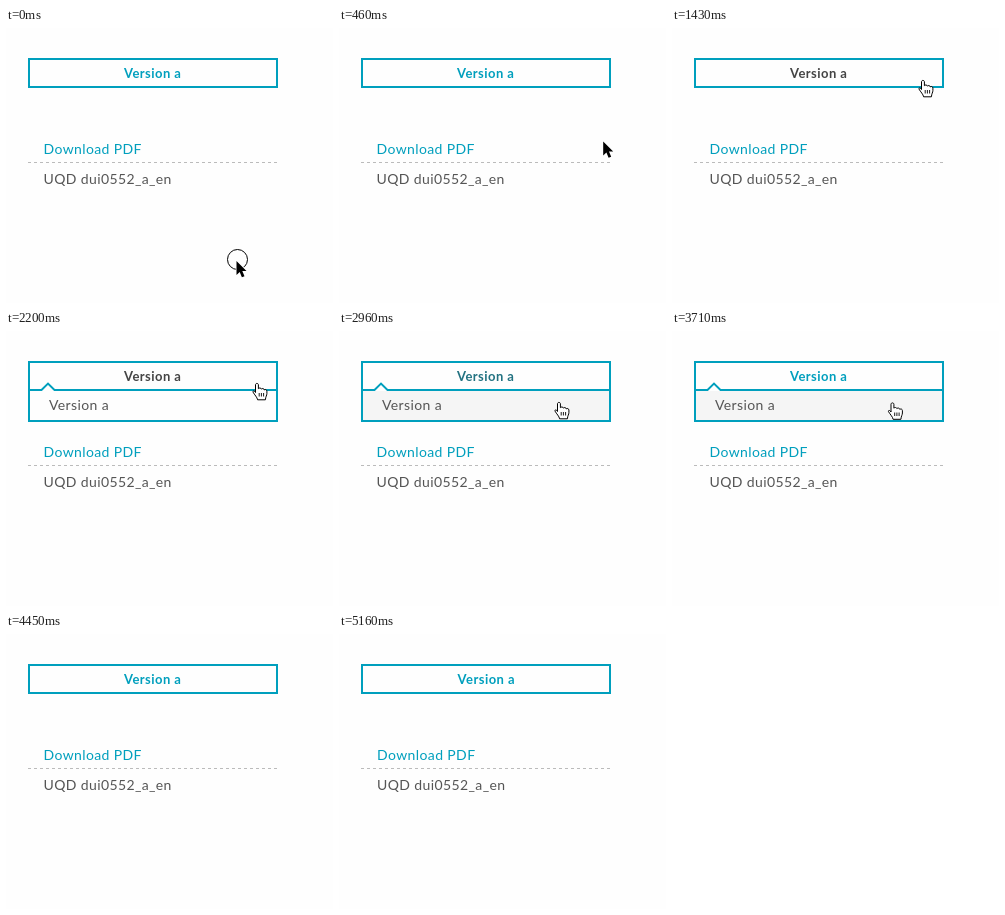
Recreate the animation shown at these times as an HTML page. Size 327 px wide and 275 px high, loop 5260 ms.

```html
<!DOCTYPE html>
<html lang="en">
<head>
<meta charset="utf-8">
<title>Version menu</title>
<style>
html, body { margin: 0; width: 100%; height: 100%; overflow: hidden; background: #fefefe; }
svg { display: block; width: 327px; height: 275px; }
text { font: 14px Lato, "Open Sans", sans-serif; letter-spacing: .38px; fill: #555; }
#title { font-size: 13px; font-weight: 700; letter-spacing: .45px; }
#link { fill: #009fbd; }
.line { fill: none; stroke: #009fbd; stroke-width: 2; }
</style>
</head>
<body>
<svg viewBox="0 0 327 275">
  <g id="page">
    <rect class="line" x="23" y="31" width="248" height="28"/>
    <path d="M22 134.5H272" stroke="#bbb" stroke-dasharray="3 3"/>
    <g id="words">
      <text id="title" x="118" y="50">Version a</text>
      <text id="link" x="37.5" y="126">Download PDF</text>
      <text x="37.5" y="156">UQD dui0552_a_en</text>
    </g>
    <g id="menu">
      <rect id="option" x="23" y="59" width="248" height="31"/>
      <path d="M35.5 60L42 52.5L48.5 60Z" fill="#fefefe"/>
      <path d="M36.5 59H47.5" stroke="#fefefe" stroke-width="2"/>
      <path class="line" d="M23 59H35.5L42 52.6L48.5 59H271V90H23Z"/>
      <text x="43" y="79">Version a</text>
    </g>
  </g>
  <g id="pointer">
    <circle id="ring" r="10" fill="none" stroke="#000"/>
    <path id="arrow" transform="translate(-1 1.5)" fill="#000" stroke="#fff" stroke-width="1.4" paint-order="stroke"
      d="M0 0V14L3.2 11.1L5.4 16.3L8 15.2L5.8 10.1H10Z"/>
    <g id="hand" transform="translate(-6.5 1)" stroke="#000" stroke-linejoin="round">
      <path fill="#fff" d="M3.5 10V2.4C3.5 .4 6.4 .4 6.4 2.4V6.2C7 5.1 9.2 5.3 9.4 6.6C10.2 5.6 12.1 6 12.3 7.4C13.2 6.6 14.9 7 14.9 8.6V11C14.9 13 13.6 14 13.4 17.3H5.6C5.2 14.8 2.6 12.4 1 9.6C.5 8.4 2.2 7.6 3.5 10Z"/>
      <path d="M7.2 10.5V14M9.4 10.5V14M11.6 10.5V14" stroke-width=".9"/>
    </g>
  </g>
</svg>
<script>
const LOOP = 5260;
const $ = id => document.getElementById(id);
const [page, words, title, menu, option, pointer, ring, arrow, hand] =
  ["page", "words", "title", "menu", "option", "pointer", "ring", "arrow", "hand"].map($);

const TEAL = [0, 159, 189], DARK = [68, 68, 68];
const mix = (a, b, p) => a + (b - a) * p;
const smooth = p => p * p * (3 - 2 * p);
const within = (t, a, b) => t >= a && t < b;
const show = (el, on) => el.setAttribute("visibility", on ? "visible" : "hidden");

// Progress from 0 to 1 in n jumps, the first at a and the last at b
function steps(t, a, b, n) {
  if (t < a) return 0;
  return Math.min(n, 1 + Math.floor((t - a) / (b - a) * (n - 1) + 0.15)) / n;
}

const START = [231.5, 231.5], REST = [265.5, 90.5], TITLE = [252.5, 50.5],
      OPTION = [221.5, 69.5], LEAVE = [296.5, 206.5], EXIT = [292, 284];
const between = (a, b, px, py) => [mix(a[0], b[0], px), mix(a[1], b[1], py)];

function position(t) {
  if (t < 1040) {
    const p = steps(t, 60, 580, 10), e = (p + smooth(p)) / 2;
    return between(START, REST, 1 - (1 - e) ** 2.5, e);
  }
  if (t < 2730) {
    const p = steps(t, 1040, 1211, 4);
    return between(REST, TITLE, 1 - (1 - p) ** 2.5, 1 - (1 - p) ** 1.6);
  }
  if (t < 3710) {
    const p = smooth(steps(t, 2730, 2958, 5));
    return between(TITLE, OPTION, p, p);
  }
  if (t < 3830) return [OPTION[0] + 0.5, OPTION[1] + 0.5];
  if (t < 4290) {
    const p = steps(t, 3830, 4230, 8);
    return between(OPTION, LEAVE, 1 - (1 - p) ** 1.5, p ** 1.2);
  }
  const p = steps(t, 4290, 4450, 4);
  return between(LEAVE, EXIT, p, p);
}

function draw(t) {
  const dark = steps(t, 1211, 1430, 4) - steps(t, 2850, 3070, 4);
  title.style.fill = `rgb(${TEAL.map((c, i) => Math.round(mix(c, DARK[i], dark)))})`;

  show(menu, within(t, 2200, 3830));
  option.setAttribute("fill", t >= 2850 ? "#f5f5f5" : "#fefefe");

  // The page reloads after the choice
  page.setAttribute("opacity", within(t, 4810, 5040) ? 0 : within(t, 5040, 5160) ? 0.5 : 1);
  words.setAttribute("transform", `translate(${t >= 5040 ? 0.6 : 0} 0)`);

  const [x, y] = position(t), pointing = within(t, 1150, 3830);
  pointer.setAttribute("transform", `translate(${x} ${y})`);
  show(pointer, t < 4450);
  show(hand, pointing && t < 4450);
  show(arrow, !pointing && t < 4450);
  show(ring, t < 60 || within(t, 690, 810) || within(t, 1900, 2020) || within(t, 3360, 3470));
}

const begin = performance.now();
function frame() {
  draw((performance.now() - begin) % LOOP);
  requestAnimationFrame(frame);
}
frame();
</script>
</body>
</html>
```
